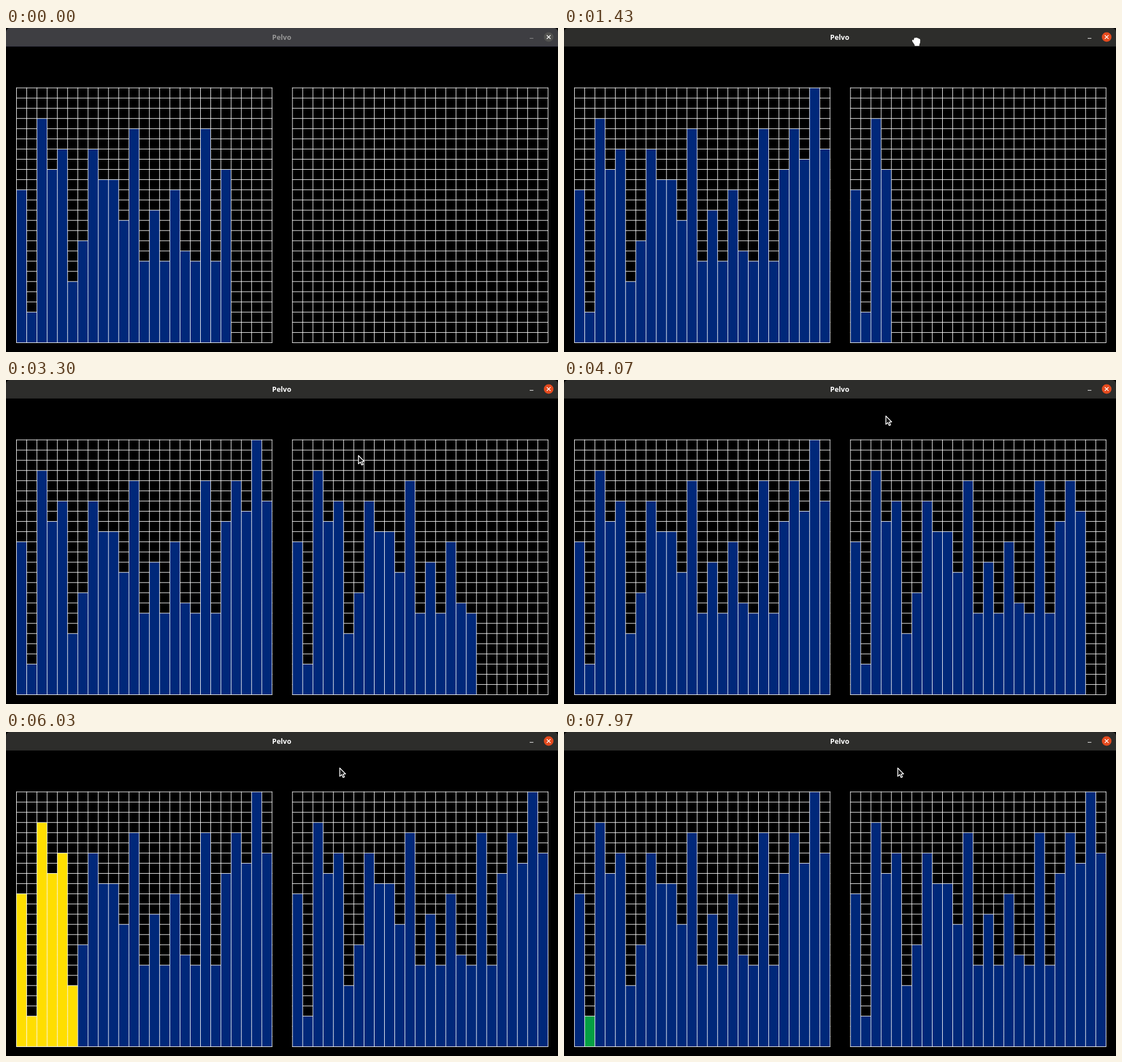
Recreate the animation shown at these times as an HTML page with a canvas. Size 975 px wide and 574 px high, loop 8 s.

```html
<!DOCTYPE html>
<html lang="en">
<head>
<meta charset="utf-8">
<title>Pelvo</title>
<style>
  html, body { margin: 0; width: 100%; height: 100%; overflow: hidden; background: #000; }
  canvas { display: block; width: 975px; height: 574px; }
</style>
</head>
<body>
<canvas id="stage" width="975" height="574"></canvas>
<script>
const ctx = document.getElementById('stage').getContext('2d');
const LOOP = 8000, COUNT = 25, CELL = 65 / 3.6, TOP = 105.6;
const BLUE = '#00287a', YELLOW = '#ffde00', GREEN = '#04a043';
const heights = [15, 3, 22, 17, 19, 6, 10, 19, 16, 16, 12, 21, 8,
                 13, 8, 15, 9, 8, 21, 8, 17, 21, 18, 25, 19];

// Bars are added one by one, with a pause between the phases.
const STEP = 137, PAUSE = 500;
const LEFT_START = 44 - 21 * STEP;
const RIGHT_START = 955;
const SORT_START = RIGHT_START + 24 * STEP + PAUSE;

// Ranges visited by the recursive halving, depth first.
const visits = [];
(function split(from, size) {
  visits.push([from, size]);
  if (size < 2) return;
  const half = size >> 1;
  split(from, half);
  split(from + half, size - half);
})(0, COUNT);

// time, x, y of the pointer tip
const pointerPath = [
  [560, 616, 0], [800, 621, 17], [1430, 622, 17], [1670, 624, 22],
  [2150, 665, 165], [2400, 669, 184], [2700, 669, 184], [3330, 622, 133],
  [3850, 568, 63], [4230, 568, 63], [4600, 589, 63]
];
const GRAB = [800, 1640];

// Grid lines keep their fractional places, so they are softened by antialiasing.
const colX = k => CELL * k - 0.05;
const rowY = k => TOP + CELL * k;
const clamp01 = v => Math.max(0, Math.min(1, v));
const added = (t, start) => Math.max(0, Math.min(COUNT, Math.floor((t - start) / STEP) + 1));
const mix = (a, b, p) => `rgb(${a.map((v, i) => Math.round(v + (b[i] - v) * p)).join(',')})`;

function rect(color, x, y, w, h) {
  ctx.fillStyle = color;
  ctx.fillRect(x, y, w, h);
}

function line(color, width, ...points) {
  ctx.strokeStyle = color;
  ctx.lineWidth = width;
  ctx.beginPath();
  points.forEach(([x, y]) => ctx.lineTo(x, y));
  ctx.stroke();
}

function drawPanel(firstCol, shown, colorOf) {
  const left = colX(firstCol), top = rowY(0), bottom = rowY(COUNT), size = CELL * COUNT + 1;
  for (let i = 0; i < COUNT; i++) rect('#fff', left, rowY(i), size, 1);
  for (let i = 0; i < shown; i++) {
    const x = colX(firstCol + i) + 0.5, y = rowY(COUNT - heights[i]);
    rect('#000', x, Math.floor(y), CELL, 2);
    rect(colorOf(i), x, y + 0.5, CELL, bottom - y);
    rect('#fff', x, y, CELL, 1);
  }
  rect('#000', left, Math.ceil(bottom + 1), size, 2);
  rect('#fff', left, bottom, size, 1);
  for (let i = 0; i <= COUNT; i++) rect('#fff', colX(firstCol + i), top, 1, size);
}

function drawTitleBar(focus) {
  ctx.fillStyle = mix([62, 62, 66], [45, 45, 43], focus);
  ctx.beginPath();
  ctx.roundRect(0, 0, 975, 33, [7, 7, 0, 0]);
  ctx.fill();
  rect(mix([48, 48, 62], [34, 34, 34], focus), 0, 32, 975, 1);

  const ink = mix([150, 150, 150], [255, 255, 255], focus);
  ctx.fillStyle = ink;
  ctx.font = 'bold 12.5px "Noto Sans", "Open Sans", sans-serif';
  ctx.textAlign = 'center';
  ctx.fillText('Pelvo', 487, 21);
  rect(ink, 925, 17.8, 6.5, 1);

  ctx.fillStyle = mix([82, 82, 80], [228, 74, 30], focus);
  ctx.beginPath();
  ctx.arc(958.5, 16, 8.5, 0, 7);
  ctx.fill();
  line('#fff', 1.3, [955.2, 12.7], [961.8, 19.3]);
  line('#fff', 1.3, [961.8, 12.7], [955.2, 19.3]);
}

const arrow = new Path2D('M.5 .8V15.6L4 12.5L6.4 17.6L8.8 16.5L6.5 11.6L10.8 11.2Z');
const hand = new Path2D('M-4 6L-6 4.5Q-7 6 -5 8L-2 12.5V14H5V12Q7 9 6.5 4Q5.5 2 4 3Q3.5 .5 2 2Q1 -.5 -.5 1.5Q-2.5 0 -3 2Z');

function drawPointer(t) {
  if (t < pointerPath[0][0]) return;
  let i = pointerPath.findIndex(p => p[0] > t);
  if (i < 0) i = pointerPath.length - 1;
  const [t0, x0, y0] = pointerPath[i - 1], [t1, x1, y1] = pointerPath[i];
  let p = clamp01((t - t0) / (t1 - t0));
  p = p * p * (3 - 2 * p);
  const grabbing = t >= GRAB[0] && t < GRAB[1];
  const shape = grabbing ? hand : arrow;
  ctx.save();
  ctx.translate(Math.round(x0 + (x1 - x0) * p), Math.round(y0 + (y1 - y0) * p));
  ctx.lineJoin = 'round';
  ctx.lineWidth = 1.4;
  ctx.fillStyle = grabbing ? '#fff' : '#1c1c1c';
  ctx.strokeStyle = '#fff';
  ctx.fill(shape);
  ctx.stroke(shape);
  ctx.restore();
}

function draw(t) {
  rect('#000', 0, 0, 975, 574);
  drawTitleBar(clamp01((t - 750) / 200));

  const visit = t < SORT_START ? null : visits[Math.floor((t - SORT_START) / PAUSE)];
  const sortColor = i => {
    if (!visit || i < visit[0] || i >= visit[0] + visit[1]) return BLUE;
    return visit[1] === 1 ? GREEN : YELLOW;
  };
  drawPanel(1, added(t, LEFT_START), sortColor);
  drawPanel(28, added(t, RIGHT_START), () => BLUE);
  drawPointer(t);
}

const begin = performance.now();
function tick() {
  draw((performance.now() - begin) % LOOP);
  requestAnimationFrame(tick);
}
tick();
</script>
</body>
</html>
```
